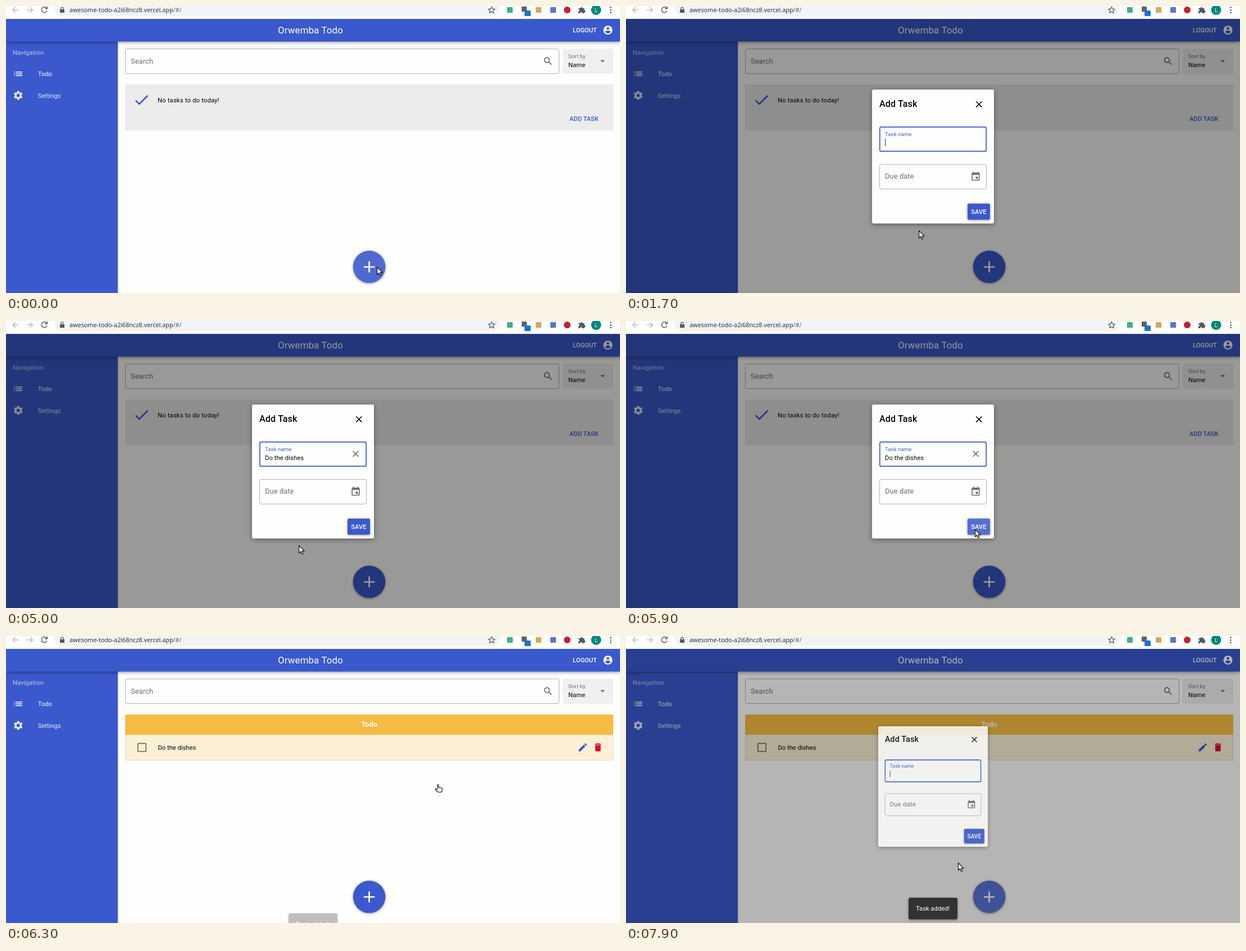
Animation, 1093 px wide and 512 px high, one loop 8 s. Source, as an HTML page:

```html
<!DOCTYPE html>
<html lang="en">
<head>
<meta charset="utf-8">
<title>Todo app</title>
<style>
html, body { margin: 0; width: 100%; height: 100%; overflow: hidden; background: #fefefd; }
svg { display: block; font: 11.2px Roboto, sans-serif; }
text { white-space: pre; }
.m { font-weight: 500; }
.big { font-size: 12.8px; letter-spacing: .00937em; }
.small { font-size: 9.6px; letter-spacing: .00937em; }
.mid { text-anchor: middle; }
.blue { fill: #3a59cc; }
.white { fill: #fff; }
.grey { fill: #6e6e6c; }
.line { fill: none; stroke: #000; stroke-opacity: .3; }
.up { filter: drop-shadow(0 1px 2px rgba(0,0,0,.4)); }
.nav { fill: none; stroke-width: 1.5; }
</style>
</head>
<body>
<svg width="1093" height="512" viewBox="0 0 1093 512">
  <defs><path id="cross" d="M19 6.41 17.59 5 12 10.59 6.41 5 5 6.41 10.59 12 5 17.59 6.41 19 12 13.41 17.59 19 19 17.59 13.41 12z"/></defs>
  <rect width="1093" height="512" fill="#fefefd"/>

  <!-- search and sort -->
  <rect class="line" x="212.5" y="76.5" width="772" height="44" rx="3"/>
  <text class="big grey" x="222" y="102.8">Search</text>
  <path class="grey" transform="translate(955.4 88.9) scale(.8)" d="M15.5 14h-.79l-.28-.27C15.41 12.59 16 11.11 16 9.5 16 5.91 13.09 3 9.5 3S3 5.91 3 9.5 5.91 16 9.5 16c1.61 0 3.09-.59 4.23-1.57l.27.28v.79l5 4.99L20.49 19l-4.99-5zm-6 0C7.01 14 5 11.99 5 9.5S7.01 5 9.5 5 14 7.01 14 9.5 11.99 14 9.5 14z"/>
  <rect x="991" y="76" width="90" height="45" rx="3" fill="#f0f0ee"/>
  <text class="small grey" x="1001" y="93">Sort by</text>
  <text x="1001" y="109" letter-spacing=".1">Name</text>
  <path class="grey" transform="translate(1052.4 88.6) scale(.8)" d="M7 10l5 5 5-5z"/>

  <!-- empty state -->
  <g id="empty">
    <rect x="212" y="140" width="869" height="82" fill="#edecec"/>
    <path class="blue" transform="translate(225.3 151.4) scale(1.333)" d="M9 16.17L4.83 12l-1.42 1.41L9 19 21 7l-1.41-1.41z"/>
    <text x="270" y="171.5" letter-spacing=".2">No tasks to do today!</text>
    <text class="m blue" x="1003" y="205">ADD TASK</text>
  </g>

  <!-- task list -->
  <g id="list">
    <rect x="212.5" y="176" width="868" height="45.5" fill="#fbf0d6" stroke="#000" stroke-opacity=".12"/>
    <rect id="rowHover" x="213" y="176" width="868" height="45" opacity="0"/>
    <path fill="#f5bc41" d="M212 176v-33q0-3 3-3h863q3 0 3 3v33z"/>
    <text class="big white mid" x="646.8" y="161.8" font-weight="700">Todo</text>
    <rect x="234.8" y="191.6" width="14.4" height="14.4" rx="1" fill="none" stroke="#6b675c" stroke-width="1.6"/>
    <text x="270.5" y="203">Do the dishes</text>
    <path class="blue" transform="translate(1017.2 189) scale(.8)" d="M3 17.25V21h3.75L17.81 9.94l-3.75-3.75L3 17.25zM20.71 7.04c.39-.39.39-1.02 0-1.41l-2.34-2.34c-.39-.39-1.02-.39-1.41 0l-1.83 1.83 3.75 3.75 1.83-1.83z"/>
    <path fill="#e00a2c" transform="translate(1044.2 189) scale(.8)" d="M6 19c0 1.1.9 2 2 2h8c1.1 0 2-.9 2-2V7H6v12zM19 4h-3.5l-1-1h-5l-1 1H5v2h14V4z"/>
  </g>

  <!-- sidebar -->
  <rect class="blue" y="63" width="199" height="449" style="filter:drop-shadow(0 0 1px rgba(0,0,0,.3))"/>
  <g class="white">
    <text x="12" y="86.6" letter-spacing=".2" opacity=".68">Navigation</text>
    <path transform="translate(12.1 111.4) scale(.8)" d="M3 13h2v-2H3v2zm0 4h2v-2H3v2zm0-8h2V7H3v2zm4 4h14v-2H7v2zm0 4h14v-2H7v2zM7 7v2h14V7H7z"/>
    <text x="56.8" y="125">Todo</text>
    <g opacity=".87">
      <g transform="translate(21.7 159.5)" fill="none" stroke="#fff">
        <circle r="4.5" stroke-width="3.2"/>
        <path stroke-width="4" d="M0-4.5V-7.8M0 4.5V7.8M3.9-2.25l2.9-1.65M-3.9 2.25l-2.9 1.65M3.9 2.25l2.9 1.65M-3.9-2.25l-2.9-1.65"/>
      </g>
      <text x="56.8" y="163.6">Settings</text>
    </g>
  </g>

  <!-- header -->
  <rect class="blue" y="23" width="1093" height="40.5" style="filter:drop-shadow(0 1px 3px rgba(0,0,0,.45))"/>
  <g class="white">
    <text class="mid" x="542" y="49" font-size="16.8" letter-spacing=".17">Orwemba Todo</text>
    <text class="m" x="1009" y="47">LOGOUT</text>
    <path transform="translate(1061.9 33.4) scale(.8)" d="M12 2C6.48 2 2 6.48 2 12s4.48 10 10 10 10-4.48 10-10S17.52 2 12 2zm0 3c1.66 0 3 1.34 3 3s-1.34 3-3 3-3-1.34-3-3 1.34-3 3-3zm0 14.2c-2.5 0-4.71-1.28-6-3.22.03-1.99 4-3.08 6-3.08 1.99 0 5.97 1.09 6 3.08-1.29 1.94-3.5 3.22-6 3.22z"/>
  </g>

  <!-- add button -->
  <g class="up">
    <circle class="blue" cx="646.6" cy="465.3" r="28.8"/>
    <circle id="glow" class="white" cx="646.6" cy="465.3" r="28.8"/>
  </g>
  <path stroke="#fff" stroke-width="2.7" d="M636.8 465.5h19.6M646.6 455.7v19.6"/>

  <rect id="shade" y="23" width="1093" height="489"/>

  <!-- dialog -->
  <g id="dialog">
    <rect x="438" y="149" width="217" height="239" rx="3" fill="#fefefd" style="filter:drop-shadow(0 2px 4px rgba(0,0,0,.4))"/>
    <text class="m" x="451" y="180.4" font-size="16" letter-spacing=".2">Add Task</text>
    <use href="#cross" transform="translate(618.7 165.7) scale(.8)"/>
    <rect x="451.8" y="215.8" width="189.4" height="43.4" rx="2.5" fill="none" stroke="#3a59cc" stroke-width="1.7"/>
    <text class="small blue" x="461" y="231.7">Task name</text>
    <text id="typed" x="461" y="247.6" letter-spacing=".105"></text>
    <rect id="caret" y="237" width="1" height="13"/>
    <use id="clear" class="grey" href="#cross" transform="translate(612.9 227.4) scale(.8)"/>
    <rect class="line" x="451.5" y="282.5" width="190" height="44" rx="3"/>
    <text class="big grey" x="461" y="308.3">Due date</text>
    <path class="grey" transform="translate(612.9 294.8) scale(.8)" d="M17 12h-5v5h5v-5zM16 1v2H8V1H6v2H5c-1.11 0-1.99.9-1.99 2L3 19c0 1.1.89 2 2 2h14c1.1 0 2-.9 2-2V5c0-1.1-.9-2-2-2h-1V1h-2zm3 18H5V8h14v11z"/>
    <rect class="blue up" x="608" y="352.5" width="40" height="28.8" rx="2.4"/>
    <rect id="saveGlow" class="white" x="608" y="352.5" width="40" height="28.8" rx="2.4"/>
    <text class="m white mid" x="628" y="371">SAVE</text>
  </g>

  <!-- notification -->
  <g id="toast">
    <rect class="up" x="503" y="467" width="87" height="38.5" rx="3" fill="#323232"/>
    <text class="white" x="516" y="490.2">Task added!</text>
  </g>

  <!-- browser bar -->
  <rect width="1093" height="23" fill="#fff"/>
  <rect x="86" y="-11" width="793" height="29" rx="14.5" fill="#f1f3f4"/>
  <g class="nav" stroke="#babcbe">
    <path d="M22.5 7H12M17 2l-5 5 5 5M37 7h10.500M42.500 2l5 5-5 5"/>
    <path stroke="#55585c" d="M72.200 3.500A5 5 0 1 0 73 8.500M73.300 1v4h-4"/>
    <path stroke="#55585c" stroke-width="1.2" d="M864.500 1.500l1.700 3.700 4 .4-3 2.700.9 4-3.600-2.100-3.600 2.100.9-4-3-2.700 4-.4z"/>
  </g>
  <path fill="#55585c" d="M96 6h8v6h-8zM97.200 6V4.500a2.800 2.800 0 0 1 5.600 0V6h-1.200V4.500a1.600 1.600 0 0 0-3.200 0V6z"/>
  <text x="113" y="11" font-size="10.8" fill="#2f3337" style="font-family:'Noto Sans','Open Sans',sans-serif">awesome-todo-a2i68ncz8.vercel.app<tspan fill="#5f6368">/#/</tspan></text>
  <rect x="892" y="2" width="10" height="10" fill="#3fb27f"/>
  <rect x="918" y="1" width="9" height="9" fill="#5b6168"/>
  <rect x="923" y="8" width="11" height="10" rx="1.500" fill="#1b74c5"/>
  <rect x="943" y="2" width="10" height="10" fill="#dba65c"/>
  <rect x="969" y="2" width="10" height="10" fill="#5a74d6"/>
  <circle cx="999" cy="7" r="6" fill="#c3202f"/>
  <path fill="#55585c" d="M1019 4h3.500a2 2 0 1 1 4 0h3v3.500a2 2 0 1 1 0 4V13h-3.500a2 2 0 0 0-4 0h-3V9.500a2 2 0 0 0 0-4z"/>
  <circle cx="1050.500" cy="7" r="9" fill="#00897b"/>
  <text class="white mid" x="1050.500" y="10.500" font-size="9.500">L</text>
  <g fill="#55585c"><circle cx="1076.500" cy="2.800" r="1.400"/><circle cx="1076.500" cy="7.300" r="1.400"/><circle cx="1076.500" cy="11.800" r="1.400"/></g>

  <!-- pointer -->
  <g id="pointer" fill="#fff" stroke="#111" stroke-width="1.200" stroke-linejoin="round">
    <path id="arrow" d="M.6.800v13.200l3-2.800 2.200 4.800 2.200-1-2.200-4.600h4.200z"/>
    <path id="hand" d="M-2 8V1.500q0-1.300 1.100-1.300T.2 1.500v3.700l5 .8q1.400.3 1.300 1.700l-.7 5.800h-7L-5.600 9q-.3-1.700 1.600-1.200z"/>
  </g>
</svg>
<script>
const LOOP = 8000, STEP = 100;
const OPEN = [640, 7738], CLOSE = 5996, FADE = 300, TOAST = 6240;
const $ = id => document.getElementById(id);
const clamp = x => Math.min(1, Math.max(0, x));

// CSS-style cubic-bezier easing
const bezier = (x1, y1, x2, y2) => x => {
  x = clamp(x);
  const at = (a, b, s) => 3 * a * s * (1 - s) ** 2 + 3 * b * s * s * (1 - s) + s ** 3;
  let lo = 0, hi = 1;
  for (let i = 0; i < 20; i++) {
    const s = (lo + hi) / 2;
    if (at(x1, x2, s) < x) lo = s; else hi = s;
  }
  return at(y1, y2, lo);
};
const ease = bezier(.25, .1, .25, 1);
const easeOut = bezier(0, 0, .58, 1);
const cubicOut = bezier(.215, .61, .355, 1);

// keys: [time, value, value, ...]
function track(keys, t) {
  const i = keys.findIndex(k => k[0] > t);
  if (i < 0) return keys[keys.length - 1].slice(1);
  const a = keys[i - 1], b = keys[i], f = (t - a[0]) / (b[0] - a[0]);
  return a.slice(1).map((v, j) => v + (b[j + 1] - v) * f);
}
const path = [
  [0, 660, 465], [600, 660, 465], [700, 648, 457], [900, 575, 418], [1100, 521, 400],
  [5000, 521, 400], [5100, 505, 402], [5200, 530, 396], [5300, 570, 388], [5500, 585, 382],
  [5700, 621, 371], [6000, 621, 371], [6100, 618, 375], [6300, 770, 265], [6500, 850, 206],
  [6800, 845, 205], [7000, 780, 300], [7200, 680, 430], [7300, 652, 466], [7500, 636, 474],
  [7700, 636, 474], [7900, 591, 404]
];
const glow = [
  [0, .1], [200, .13], [600, .13], [700, .2], [1100, .04], [1400, 0],
  [7200, 0], [7300, .1], [7700, .14], [7800, .2], [7900, .16]
];
const typing = [
  [2200, 1], [2500, 2], [2600, 3], [2700, 4], [2800, 5], [2900, 6], [3000, 7],
  [3400, 8], [3500, 9], [4100, 11], [4200, 12], [4400, 13]
];

function zoom(el, scale, opacity, cx, cy) {
  el.setAttribute("transform", `translate(${cx} ${cy}) scale(${scale}) translate(${-cx} ${-cy})`);
  el.setAttribute("opacity", opacity);
}
const show = (id, on) => $(id).setAttribute("visibility", on ? "visible" : "hidden");

function draw(t) {
  const leaving = t >= CLOSE && t < OPEN[1];
  const start = t < CLOSE ? OPEN[0] : OPEN[1];
  const p = leaving ? (t - CLOSE) / FADE : (t - start) / FADE;
  const mix = f => leaving ? 1 - f(p) : f(p);
  $("shade").setAttribute("opacity", .4 * mix(easeOut));
  zoom($("dialog"), mix(cubicOut), mix(leaving ? easeOut : ease), 546.5, 268.5);

  const swap = (t - CLOSE) / FADE, half = ease(swap * 2);
  zoom($("empty"), 1 - .7 * half, 1 - half, 646.5, 181);
  zoom($("list"), .3 + .7 * ease(swap), half, 646.5, 181);
  $("rowHover").setAttribute("opacity", t >= 6400 && t < 6900 ? .05 : 0);

  const fresh = t >= OPEN[1];
  const key = fresh ? null : typing.filter(k => k[0] <= t).pop();
  const count = key ? key[1] : 0;
  $("typed").textContent = "Do the dishes".slice(0, count);
  $("caret").setAttribute("x", 461 + (count ? $("typed").getSubStringLength(0, count) : 0));
  const blink = (t >= 1400 && t < 1700) || t >= 5000;
  $("caret").setAttribute("opacity", fresh || !blink ? .8 : 0);
  $("clear").setAttribute("opacity", count ? 1 : 0);
  $("saveGlow").setAttribute("opacity", t >= 5600 && t < OPEN[1] ? .13 : 0);
  $("glow").setAttribute("opacity", track(glow, t)[0]);

  const rise = easeOut((t - TOAST) / FADE);
  $("toast").setAttribute("transform", `translate(0 ${40 * (1 - rise)})`);
  $("toast").setAttribute("opacity", rise);

  const [x, y] = track(path, t), hand = t >= 6300 && t < 6900;
  $("pointer").setAttribute("transform", `translate(${x} ${y})`);
  show("hand", hand);
  show("arrow", !hand);
}

function frame(now) {
  draw(Math.floor(now % LOOP / STEP) * STEP);
  requestAnimationFrame(frame);
}
draw(0);
requestAnimationFrame(frame);
</script>
</body>
</html>
```
